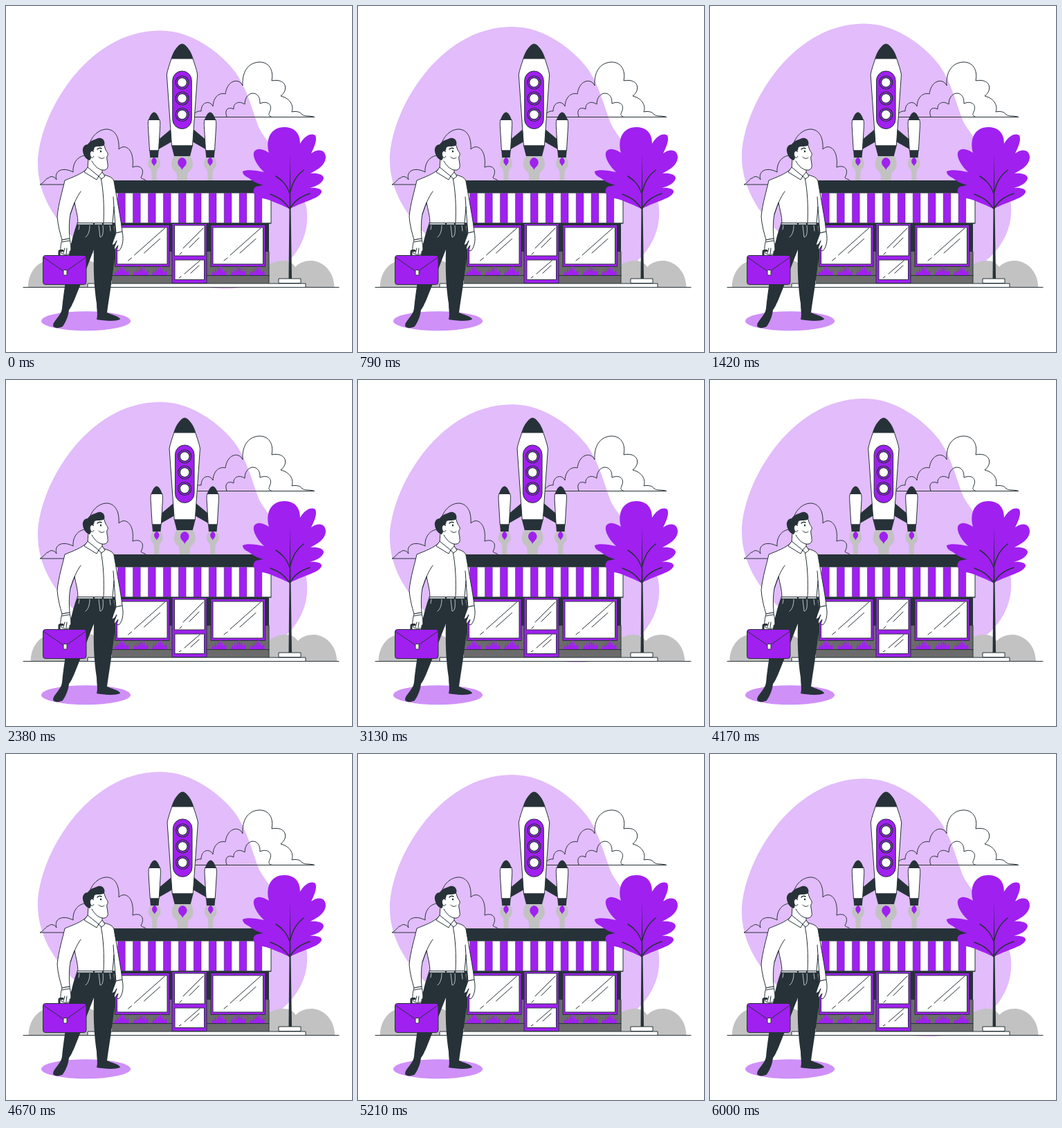
Write an HTML page that moves like this. It is 500 by 500 pixels and loops after 6.04 s.

```html
<!DOCTYPE html>
<html lang="en">
<head>
<meta charset="utf-8">
<title>Shop launch</title>
<style>
  html, body { margin: 0; width: 100%; height: 100%; overflow: hidden; background: #fff; }
  svg { display: block; width: 100vw; height: 100vh; }
  .line { fill: none; stroke: #263238; stroke-linecap: round; stroke-linejoin: round; }
  .paper { fill: #fff; stroke: #263238; stroke-linejoin: round; }
  .accent { fill: #a020f0; stroke: #263238; stroke-linejoin: round; }
  .purple { fill: #a020f0; }
  .dark { fill: #263238; }
  .gray { fill: #c2c2c2; }
  .wall { fill: #6b6b6b; }
</style>
</head>
<body>
<svg viewBox="0 0 500 500">
  <defs>
    <g id="booster">
      <path class="gray" d="M-6 219C-10 225-10 232-5 236Q-3 238-3.500 253H3.500Q3 238 5 236C10 232 10 225 6 219Z"/>
      <path class="purple" d="M0 218.500C3 220 4 223 3.600 225.500C3 228 1 229 0 231.500C-1 229-3 228-3.600 225.500C-4 223-3 220 0 218.500Z"/>
      <path class="paper" d="M-7.800 164C-9 167-8.700 171-8.500 176L-6.500 209H6.500L8.500 176C8.700 171 9 167 7.800 164Z"/>
      <path class="dark" d="M-8 165C-6.500 159-3 153.500 0 153.500S6.500 159 8 165ZM-6.700 208.500H6.700L5.800 219H-5.800Z"/>
    </g>
    <g id="porthole" stroke-width="1.200">
      <circle class="accent" r="9.500"/>
      <circle class="paper" r="6.800"/>
    </g>
    <path id="tuft" class="purple" d="M-11 389L-9 383L-6 386L-6 379L-3 385L-2 377L0 383L1 373L3 384L5 378L6 385L10 382L11 389Z"/>
    <g id="window">
      <rect class="accent" y="316.500" width="78.500" height="60"/>
      <rect class="paper" x="3" y="320" width="72.500" height="53"/>
      <path class="line" d="M28 360L72 321M42 357L65 336.500M19 368L24 364"/>
    </g>
  </defs>

  <path id="blob" fill="#e2bcfb" d="M222 35.500C270 35 312 70 331 95C349 120 356 152 366 177C382 207 425 245 434 290C440 325 425 363 385 388C350 407 335 408.500 317 408.500C260 408 165 385 125 357C95 337 46 290 46 228C46 160 115 36 222 35.500Z"/>

  <g class="line">
    <path d="M268 160.500H446C438 158 432 160 428 157C425 152 418 152 413 153C416 145 412 134 397 130C409 121 405 104 384 108C387 92 380 81 366 81C349 82 341 96 342 115C337 104 320 106 317 127C309 125 300 130 299 145C295 136 282 138 282 152C276 151 272 155 268 160.500"/>
    <path d="M319 160C315 150 321 145 329 149C328 141 336 136 345 142C345 122 368 120 367 141C378 136 386 143 381 153C380 157 378 158 384 160.500"/>
    <path d="M202 258H49C56 255 58 248 61 249C64 245 70 246 73 251C69 238 82 232 97 240C96 225 106 214 120 216C116 196 130 178 146 178C158 179 164 190 163 207C172 198 186 207 183 233C193 229 202 235 195 248C197 251 199 249 202 252"/>
  </g>

  <g id="bushes" class="gray">
    <path d="M32 406C32 386 45 368 63 368C74 368 82 371 88 377C93 369 101 366 112 366C128 367 146 382 147 406Z"/>
    <path d="M360 406C362 385 380 368 400 368C408 368 414 371 418 377C424 371 432 368 441 368C460 369 474 385 474.500 406Z"/>
  </g>

  <g id="rocket">
    <g transform="translate(254.500 0)">
      <path class="gray" d="M-12 217C-17 226-17 235-9 240Q-7 243-7.500 253H7.500Q7 243 9 240C17 235 17 226 12 217Z"/>
      <path class="purple" d="M0 219C5 220 7 224 6 228C5 232 1 233 0 237C-1 233-5 232-6 228C-7 224-5 220 0 219Z"/>
      <path class="dark" d="M-15 177L-34 193V207L-13 195ZM15 177L34 193V207L13 195Z"/>
      <use href="#booster" x="-40.500"/>
      <use href="#booster" x="40.500"/>
      <path class="paper" d="M-15.500 76C-18 84-21 92-22.200 99L-15 202H15L22.200 99C21 92 18 84 15.500 76Z"/>
      <path class="dark" d="M-16 76C-13 65-5 54.500 0 54.500S13 65 16 76ZM-15.500 201.500H15.500L11.500 217H-11.500Z"/>
      <rect class="accent" x="-13.800" y="94" width="27.600" height="83.500" rx="13.800"/>
      <use href="#porthole" y="110.500"/>
      <use href="#porthole" y="133.500"/>
      <use href="#porthole" y="157"/>
    </g>
  </g>

  <g id="shop">
    <rect class="wall" x="153" y="314" width="227" height="87"/>
    <path class="dark" d="M153 314H380V355H374V318H296V355H290V318H240V355H235V318H153Z"/>
    <path class="dark" d="M152 252H372L383 270H152Z"/>
    <rect class="paper" x="152" y="270" width="231" height="44"/>
    <g id="stripes" stroke-width=".4"></g>
    <path class="line" d="M152 314H383"/>
    <use href="#window" x="157.500"/>
    <use href="#window" x="296"/>
    <use href="#tuft" x="167"/><use href="#tuft" x="195"/><use href="#tuft" x="222"/>
    <use href="#tuft" x="308"/><use href="#tuft" x="336"/><use href="#tuft" x="363"/>
    <path class="line" d="M153 389.500H240M290 389.500H380M380 355V401"/>
    <rect class="accent" x="240" y="314.500" width="50" height="86"/>
    <rect class="paper" x="243.500" y="317" width="43.500" height="44"/>
    <rect class="paper" x="244" y="367" width="42.500" height="28.500"/>
    <path class="line" d="M256 350L285 321M265 349L279 335M251 359L254 356M258 387L280 368M267 386L279 375M250 393L253 391"/>
    <rect class="paper" x="118" y="401" width="315" height="5.500"/>
  </g>

  <g id="tree">
    <path class="purple" d="M410 293C394 286 380 279 366 277C358 276 355 266 360 262C363 260 367 260 372 259C362 257 354 251 350 248C345 246 342 243 342 239C347 236 360 237 373 240C362 230 355 216 359 210C364 204 372 207 380 212C375 194 381 175 403 175C420 176 425 187 425 199C432 187 441 183 447 187C450 193 446 203 441 213C452 205 462 208 462 219C461 231 449 237 440 242C449 241 459 243 459 249C458 256 447 261 439 263C448 262 457 264 456 269C453 278 434 281 410 293Z"/>
    <path class="dark" d="M410.500 212L411.500 290L413 394H408.500L409.500 290Z"/>
    <path class="line" stroke-width="1.500" d="M410 293C403 283 396 277 382 272M411 292C417 281 426 275 439 271M410 271C405 257 398 251 390 246M411 268C415 252 421 244 430 237"/>
    <rect class="paper" x="394" y="394" width="32" height="6.500"/>
  </g>

  <path class="line" d="M25 406.500H481"/>
  <ellipse fill="#cf90f8" cx="115.500" cy="455.200" rx="64.500" ry="14"/>

  <g id="man">
    <path class="dark" d="M103 313H154C158 328 160 347 156 372C153 398 149 421 146 443C154 447 164 448 165 453C158 456 141 455 131 453C133 445 131 440 131 430C128 408 126 390 127 352C119 372 109 400 99 424C95 433 93 437 91 439C90 449 86 457 82 463C77 466 69 466 68 462C68 455 80 447 81 437C82 425 84 412 86 398C88 371 94 337 103 313Z"/>
    <path class="line" style="stroke:#fff;stroke-width:.7" d="M121 317C121 325 119 331 115 334M134 317L136 334C140 334 141 327 140 317M106 317L105 323M150 317L151 325"/>
    <path class="paper" d="M117 235C109 243 97 247 85 252C82 266 76 284 74 304C75 317 78 328 81 338L92 336C91 324 91 311 93 301L99 284C101 294 104 304 104 314H154L156 290C157 305 158 318 159 328L168 326C166 308 161 283 156 253C154 247 148 246 139 243Z"/>
    <path class="line" d="M137 248C141 267 142 290 141 314M93 301C97 288 102 276 108 268M156 290L155 276"/>
    <path class="paper" d="M103 313.500H154V316H103Z"/>
    <path class="dark" d="M126 313H128V317H126ZM139 313H141V317H139Z"/>
    <path class="paper" d="M159 328C157 334 154 341 153 346L157 344L160 339C158 346 155 350 157 352L162 346L160 353L163 354C167 350 171 341 168 326Z"/>
    <path class="paper" d="M81 338C79 345 78 351 80 357C83 360 90 360 93 357C95 350 93 343 92 336Z"/>
    <path class="line" d="M83 357L85 350M87 358L88 350M81 341L92 339"/>
    <path class="paper" d="M119 218L118 236L134 247L139 244L139 237C145 238 148 234 147 229C147 225 145 221 146 217C149 215 146 211 144 208L141 199L126 201Z"/>
    <path class="dark" d="M121 223C116 222 112 217 111 210C110 204 114 200 118 200C122 194 129 193 133 191C140 189 144 196 142 201C138 204 132 202 128 204C127 208 126 210 125 214C123 217 123 221 121 223Z"/>
    <path class="paper" d="M127 211C123 207 120 212 122 217C123 220 126 220 127 217"/>
    <path class="line" d="M134 218C136 221 140 221 142 219M124 224C128 231 133 236 139 237"/>
    <path class="line" stroke-width="1.500" d="M132 207C134 205 136 205 138 206"/>
    <ellipse class="dark" cx="137" cy="210" rx="1.200" ry="1.600"/>
    <path class="paper" d="M118 233L134 246L131 251L113 240ZM139 240L143 246L138 250L134 246Z"/>
  </g>

  <g id="briefcase">
    <path class="line" stroke-width="3" d="M77 360V355Q77 353.500 79 353.500H82M93 360V355"/>
    <rect class="accent" x="53.500" y="360.500" width="62.500" height="42" rx="3.500"/>
    <path class="line" d="M54.500 363.500L85 384.500L115 363.500"/>
    <rect class="paper" x="83" y="381.500" width="5" height="7.500" rx="1"/>
  </g>
</svg>
<script>
  const LOOP = 6040, SHAKE = 6000, FLOAT = 3000;
  const SHAKE_STEPS = [0, -1, 2, -4, 4, -4, 4, -4, 2, -1, 0];
  const byId = id => document.getElementById(id);
  const shift = (id, x, y) => byId(id).setAttribute('transform', `translate(${x} ${y})`);

  for (let i = 0; i < 10; i++) {
    const stripe = document.createElementNS('http://www.w3.org/2000/svg', 'rect');
    const attrs = { x: 161.5 + i * 21.95, y: 270.5, width: 10.8, height: 43, class: 'accent' };
    for (const key in attrs) stripe.setAttribute(key, attrs[key]);
    byId('stripes').append(stripe);
  }

  // Linear shake between evenly spaced stops, at rest near both ends.
  function shakeAt(t) {
    if (t < 640 || t > 5200) return 0;
    const pos = t / SHAKE * 10, i = Math.floor(pos);
    return SHAKE_STEPS[i] + (SHAKE_STEPS[i + 1] - SHAKE_STEPS[i]) * (pos - i);
  }

  function draw(t) {
    const dx = shakeAt(t);
    shift('blob', 0, -5 * (1 - Math.cos(2 * Math.PI * t / FLOAT)));
    shift('bushes', dx, 0);
    shift('rocket', dx, 0);
  }

  const start = performance.now();
  function tick() {
    draw((performance.now() - start) % LOOP);
    requestAnimationFrame(tick);
  }
  tick();
</script>
</body>
</html>
```
